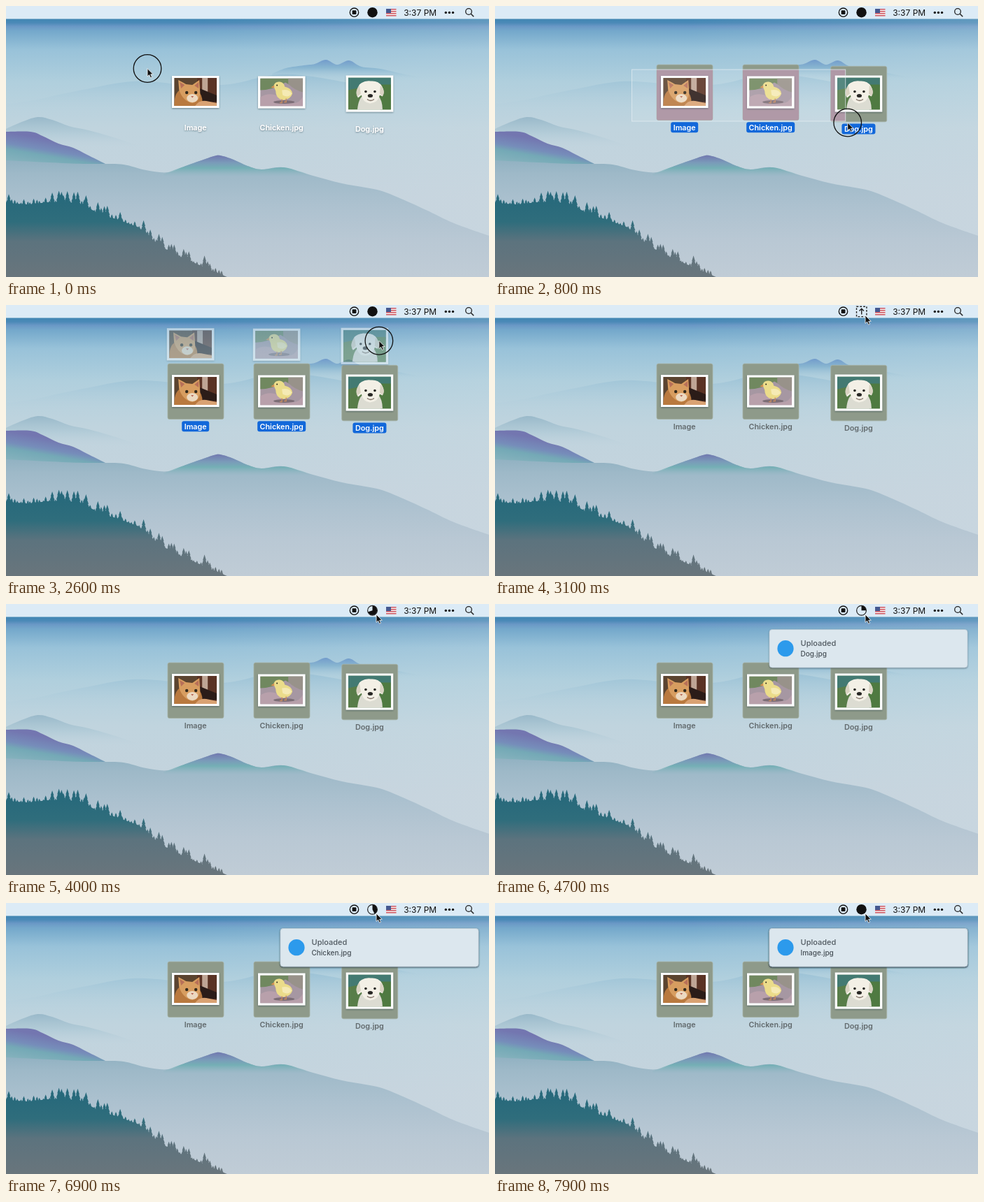
An HTML page for the animation above (8 s loop, 690 by 388 pixels).

```html
<!DOCTYPE html>
<html lang="en">
<head>
<meta charset="utf-8">
<title>Drag to upload</title>
<style>
html, body { margin: 0; width: 100%; height: 100%; overflow: hidden; }
svg { display: block; width: 100vw; height: 100vh; }
text { font-family: Inter, "Open Sans", sans-serif; }
.label { font-size: 10.8px; font-weight: 600; text-anchor: middle; }
</style>
</head>
<body>
<svg id="stage" viewBox="0 0 690 388" preserveAspectRatio="none">
  <defs>
    <linearGradient id="sky" x2="0" y2="1">
      <stop offset=".046" stop-color="#3f86b2"/><stop offset=".062" stop-color="#4b89b7"/>
      <stop offset=".075" stop-color="#6a98c6"/><stop offset=".092" stop-color="#74a8cb"/>
      <stop offset=".16" stop-color="#98c2d9"/><stop offset=".28" stop-color="#b0cfdd"/>
      <stop offset=".45" stop-color="#c0d4de"/><stop offset=".7" stop-color="#c5d3dd"/>
    </linearGradient>
    <linearGradient id="glow">
      <stop offset=".4" stop-color="#d3e0e7" stop-opacity="0"/><stop offset="1" stop-color="#d3e0e7" stop-opacity=".2"/>
    </linearGradient>
    <linearGradient id="far" gradientUnits="userSpaceOnUse" x1="0" y1="76" x2="0" y2="103">
      <stop offset="0" stop-color="#7099cb"/><stop offset=".45" stop-color="#88b5d0"/><stop offset="1" stop-color="#a6c8d9" stop-opacity="0"/>
    </linearGradient>
    <linearGradient id="faint" gradientUnits="userSpaceOnUse" x1="0" y1="104" x2="0" y2="150">
      <stop offset="0" stop-color="#8fbad2" stop-opacity=".5"/><stop offset="1" stop-color="#b4cfdc" stop-opacity="0"/>
    </linearGradient>
    <linearGradient id="mid" gradientUnits="userSpaceOnUse" x1="0" y1="158" x2="0" y2="202">
      <stop offset="0" stop-color="#98b8c9"/><stop offset=".5" stop-color="#adc8d5" stop-opacity=".8"/>
      <stop offset="1" stop-color="#bcd1dc" stop-opacity="0"/>
    </linearGradient>
    <linearGradient id="leftHill" gradientUnits="userSpaceOnUse" x1="0" y1="180" x2="-9" y2="232">
      <stop offset="0" stop-color="#7376b0"/><stop offset=".3" stop-color="#768dba"/>
      <stop offset=".46" stop-color="#74a9b6"/><stop offset="1" stop-color="#93b9c2"/>
    </linearGradient>
    <linearGradient id="ridge" gradientUnits="userSpaceOnUse" x1="0" y1="214" x2="0" y2="388">
      <stop offset="0" stop-color="#8dafc0"/><stop offset=".15" stop-color="#9eb9c8"/>
      <stop offset=".4" stop-color="#acc1cf"/><stop offset=".7" stop-color="#b9c8d4"/><stop offset="1" stop-color="#c0ccd6"/>
    </linearGradient>
    <linearGradient id="cap" gradientUnits="userSpaceOnUse" x1="0" y1="214" x2="0" y2="244">
      <stop offset="0" stop-color="#7279b0"/><stop offset=".35" stop-color="#7a9bb9"/>
      <stop offset=".6" stop-color="#74afb5"/><stop offset="1" stop-color="#8eb5c1" stop-opacity="0"/>
    </linearGradient>
    <linearGradient id="forest" gradientUnits="userSpaceOnUse" x1="0" y1="275" x2="0" y2="388">
      <stop offset="0" stop-color="#27697b"/><stop offset=".3" stop-color="#2f6d7c"/>
      <stop offset=".55" stop-color="#5c737e"/><stop offset="1" stop-color="#69757c"/>
    </linearGradient>
    <filter id="soft" x="-20%" y="-20%" width="140%" height="150%">
      <feDropShadow dx="0" dy="1" stdDeviation="1.2" flood-color="#1c3440" flood-opacity=".55"/>
    </filter>
    <clipPath id="marqueeClip"><rect id="marqueeArea"/></clipPath>
    <clipPath id="photoClip"><rect width="61" height="40"/></clipPath>
    <clipPath id="dogClip"><rect width="61" height="46"/></clipPath>

    <g id="cat" clip-path="url(#photoClip)">
      <rect width="61" height="40" fill="#5b4430"/>
      <path d="M33 0H61V40H33Z" fill="#5a3325"/><path d="M40 0H48V22H40Z" fill="#bfa595"/>
      <path d="M34 14L61 25V34L32 36Z" fill="#2b1c18"/>
      <path d="M0 40Q0 18 12 16L34 18Q42 26 40 40Z" fill="#b9793f"/>
      <path d="M7 17L6 3L17 9L26 10L36 3L37 19Q38 33 26 36Q12 33 7 17Z" fill="#d79d60"/>
      <path d="M8 6L15 10L10 15ZM29 11L35 6L35 15Z" fill="#b87058"/>
      <ellipse cx="26" cy="29" rx="8" ry="6" fill="#ecd9c1"/>
      <circle cx="18" cy="21" r="2.2" fill="#33291b"/><circle cx="31" cy="21" r="2.2" fill="#33291b"/>
      <path d="M24 26H28L26 28.5Z" fill="#b66554"/>
      <path d="M30 40Q36 31 46 33L61 36V40Z" fill="#d9a273"/>
    </g>
    <g id="chick" clip-path="url(#photoClip)">
      <rect width="61" height="40" fill="#a697a2"/>
      <path d="M0 0H61V10Q46 13 36 6Q17 17 0 17Z" fill="#70885f"/>
      <path d="M40 0H61V20Q49 17 40 8Z" fill="#98928a"/>
      <path d="M0 27Q16 17 34 30T61 26V40H0Z" fill="#b8a0ab"/>
      <ellipse cx="34" cy="34" rx="15" ry="2.5" fill="#7c6d76"/>
      <path d="M19 11Q21 4 28 5Q34 6 35 12Q45 14 46 22Q43 31 32 31Q22 29 22 18Z" fill="#ebdc8a"/>
      <path d="M31 17Q41 15 45 22Q40 29 32 24Z" fill="#f5eab4"/>
      <path d="M20 10L15 13L20 14Z" fill="#d99052"/><circle cx="24" cy="10" r="1" fill="#2d281d"/>
      <path d="M31 30V35H28M37 29V34H34" fill="none" stroke="#c58b60" stroke-width="1.4"/>
    </g>
    <g id="dog" clip-path="url(#dogClip)">
      <rect width="61" height="46" fill="#587d49"/>
      <path d="M0 0H61V14Q42 6 22 13L0 18Z" fill="#437a72"/><path d="M45 10H61V46H46Z" fill="#4f7a41"/>
      <path d="M13 46Q15 28 22 26H43Q49 33 49 46Z" fill="#dcdcd2"/>
      <path d="M16 10Q22 4 32 5Q43 4 48 12Q53 20 49 27L45 25Q43 36 31 37Q21 36 19 25L14 29Q9 22 16 10Z" fill="#f3f0e6"/>
      <path d="M16 11Q9 20 13 27L18 23ZM46 11Q54 20 49 26L45 23Z" fill="#d9d3c2"/>
      <circle cx="25" cy="20" r="1.8" fill="#272623"/><circle cx="38" cy="20" r="1.8" fill="#272623"/>
      <ellipse cx="31.5" cy="26" rx="3.6" ry="2.5" fill="#272623"/>
      <path d="M27 31Q32 35 37 31" fill="none" stroke="#7c6d63" stroke-width="1.3"/>
    </g>
  </defs>

  <rect width="690" height="388" fill="url(#sky)"/>
  <rect width="690" height="388" fill="url(#glow)"/>
  <g id="land"></g>

  <g id="files"></g>
  <g id="marqueeTint" clip-path="url(#marqueeClip)" fill="#a78d9d"></g>
  <g id="photos"></g>
  <rect id="marquee" fill="#fff" fill-opacity=".1" stroke="#e3edf2" stroke-opacity=".75"/>
  <g id="ghosts" opacity=".5"></g>

  <rect width="690" height="18.5" fill="#dcebf6"/>
  <g id="menu" fill="#111">
    <circle cx="497.5" cy="9.2" r="6.2" fill="none" stroke="#111" stroke-width="1.3"/>
    <rect x="494.6" y="6.3" width="5.8" height="5.8" rx=".8"/>
    <g id="flag">
      <rect x="543" y="4" width="14.5" height="10.5" fill="#f4eeee"/>
      <path d="M543 4.8H557.5M543 7.8H557.5M543 10.8H557.5M543 13.8H557.5" stroke="#cf5661" stroke-width="1.5"/>
      <rect x="543" y="4" width="7" height="6" fill="#45588f"/>
    </g>
    <text x="568.2" y="13.6" font-size="12">3:37 PM</text>
    <circle cx="628.3" cy="9.4" r="1.7"/><circle cx="633.4" cy="9.4" r="1.7"/><circle cx="638.5" cy="9.4" r="1.7"/>
    <path d="M664.2 11.2L668.2 15.2" stroke="#222" stroke-width="1.5"/>
    <circle cx="661" cy="8" r="4.3" fill="none" stroke="#222" stroke-width="1.3"/>
    <circle id="idle" cx="523.5" cy="9.2" r="7.2"/>
    <g id="dropHint" fill="none" stroke="#222" stroke-width="1.4">
      <rect x="516.5" y="2.2" width="14.4" height="14.4" stroke-dasharray="2.8 2"/>
      <path d="M523.7 13.5V5.5M520.5 8.5L523.7 5.2L526.9 8.5"/>
    </g>
    <g id="progress">
      <circle cx="523.5" cy="9.2" r="6.9" fill="none" stroke="#222" stroke-width="1.2"/><path id="pie"/>
    </g>
  </g>

  <g id="banners"></g>
  <circle id="press" r="19.8" fill="none" stroke="#111" stroke-width="1.3"/>
  <path id="cursor" d="M0 0V11.4L2.6 9.1L4.5 13.2L6.5 12.3L4.7 8.3H8.2Z" fill="#111" stroke="#fff" stroke-width=".8"/>
</svg>
<script>
const $ = id => document.getElementById(id);
const LOOP = 8000, STEP = 100;

function add(parent, tag, attrs, text) {
  const el = document.createElementNS("http://www.w3.org/2000/svg", tag);
  set(el, attrs);
  if (text) el.textContent = text;
  return parent.appendChild(el);
}
function set(el, attrs) {
  for (const k in attrs) el.setAttribute(k, attrs[k]);
}
const show = (el, on) => el.setAttribute("visibility", on ? "visible" : "hidden");
const clamp = v => Math.max(0, Math.min(1, v));
const ease = v => v * v * (3 - 2 * v);

// Interpolates [time, ...values] keys.
function track(keys, t, curve = v => v) {
  const i = keys.findIndex(k => k[0] > t);
  if (i < 0) return keys[keys.length - 1].slice(1);
  if (i === 0) return keys[0].slice(1);
  const a = keys[i - 1], b = keys[i], p = curve((t - a[0]) / (b[0] - a[0]));
  return a.slice(1).map((v, j) => v + (b[j + 1] - v) * p);
}

// Smooth hill through "x,y" points, closed at the given base line.
function hill(points, base, fill) {
  const p = points.split(" ").map(s => s.split(",").map(Number));
  let d = `M${p[0][0]} ${base}L${p[0]}`;
  for (let i = 0; i < p.length - 1; i++) {
    const a = p[i - 1] || p[i], b = p[i], c = p[i + 1], e = p[i + 2] || c;
    d += `C${b.map((v, k) => v + (c[k] - a[k]) / 6)} ${c.map((v, k) => v - (e[k] - b[k]) / 6)} ${c}`;
  }
  add($("land"), "path", { d: `${d}V${base}Z`, fill });
}

const summit = "262,227 285,219 297,215 306,214 325,220 345,229 365,234 395,231 ";
hill("380,97 400,89 425,85 441,83 457,77 473,84 490,78 508,87 535,90 570,98 600,103", 103, "url(#far)");
hill("0,141 45,134 80,126 125,117 150,112 180,108 215,109 260,113 320,112 380,99 430,100 500,112", 150, "url(#faint)");
hill("0,176 20,167 45,159 66,163 90,172 118,178 150,187 190,200", 202, "url(#mid)");
hill("0,180 35,180 52,186 75,197 96,203 116,213 142,226 160,234", 260, "url(#leftHill)");
hill("0,221 60,224 110,226 140,226 168,227 200,235 232,238 " + summit +
  "435,242 480,254 530,263 560,274 600,292 640,311 690,329", 388, "url(#ridge)");
hill("225,241 240,235 " + summit + "420,237 440,244", 244, "url(#cap)");

function forest() {
  const slope = [[0, 282], [30, 284], [60, 281], [85, 280], [110, 284], [130, 296], [160, 306],
    [190, 317], [210, 337], [240, 355], [265, 366], [300, 381], [318, 389]];
  let seed = 11;
  const rand = () => (seed = seed * 16807 % 2147483647) / 2147483647;
  let d = "M0 388" + slope.map(p => "L" + p).join("") + "Z";
  for (let x = -3; x < 312; x += 2.5 + rand() * 4) {
    const y = track(slope, x)[0] + 4, h = 6 + rand() ** 2 * 15, w = 2 + h * .17;
    d += `M${x} ${y - h}l${w * .45} ${h * .4}h${-w * .15}l${w * .4} ${h * .3}h${-w * .2}l${w * .7} ${h * .5}` +
      `h${-w * 2.4}l${w * .7} ${-h * .5}h${-w * .2}l${w * .4} ${-h * .3}h${-w * .15}Z`;
  }
  add($("land"), "path", { d, fill: "url(#forest)" });
}
forest();

const files = [
  { name: "Image", art: "cat", x: 237, y: 100, h: 46, pill: 39 },
  { name: "Chicken.jpg", art: "chick", x: 360, y: 100.5, h: 46, pill: 69 },
  { name: "Dog.jpg", art: "dog", x: 485.7, y: 99.5, h: 52, pill: 48 }
];

function framed(parent, f) {
  const g = add(parent, "g", { transform: `translate(${f.x} ${f.y})` });
  add(g, "rect", { width: 67.5, height: f.h, fill: "#fcfdfd", filter: "url(#soft)" });
  add(g, "use", { href: "#" + f.art, x: 3.2, y: 3 });
  return g;
}

for (const f of files) {
  const cx = f.x + 33.7, low = f.art === "dog" ? 2.3 : 0;
  const box = { x: f.x - 6, y: 84 + low, width: 80, height: 79.5, rx: 2.5 };
  f.box = add($("files"), "rect", { ...box, fill: "#8e9a8a", stroke: "#a6b2a5", "stroke-width": .8 });
  f.tint = add($("marqueeTint"), "rect", box);
  f.pillBox = add($("files"), "rect", { x: cx - f.pill / 2, y: 166.3 + low, width: f.pill, height: 15, rx: 3, fill: "#1268da" });
  f.label = add($("files"), "text", { x: cx, y: 177.5 + low, class: "label" }, f.name);
  framed($("photos"), f);
  f.ghost = framed($("ghosts"), f);
}

const banners = [["Dog.jpg", 4300], ["Chicken.jpg", 6500], ["Image.jpg", 7500]].map(([name, start]) => {
  const el = add($("banners"), "g", {});
  add(el, "rect", { x: 392, y: 36.5, width: 283, height: 54.5, rx: 4, fill: "#dce7ee", stroke: "#b2c5d0", "stroke-width": .6, filter: "url(#soft)" });
  add(el, "circle", { cx: 415, cy: 63.7, r: 11.6, fill: "#2c9aec" });
  add(el, "text", { x: 436.5, y: 60, "font-size": 11, "font-weight": 500, fill: "#505960" }, "Uploaded");
  add(el, "text", { x: 436.5, y: 74.8, "font-size": 10, "font-weight": 500, fill: "#454e55" }, name);
  return { el, start };
});

const cursorPath = [[0, 202, 89.5], [100, 195, 91], [800, 503.7, 167], [900, 507, 168], [1300, 507, 168],
  [1800, 556, 99], [2100, 540, 118], [2300, 540, 118], [2800, 529, 15]];
const uploads = [[3300, 0], [4300, 1], [4400, 0], [4700, .25], [6200, 1], [6300, 0], [6400, .02], [7600, 1]];
const DROP = 2900, DONE = 7700;

function wedge(p) {
  const a = Math.min(p, .9999) * 2 * Math.PI, r = 6.6;
  return `M523.5 9.2v${-r}A${r} ${r} 0 ${+(p > .5)} 1 ${523.5 + r * Math.sin(a)} ${9.2 - r * Math.cos(a)}Z`;
}

function draw(t) {
  const [x, y] = track(cursorPath, t, ease);
  const dragging = t >= 2200 && t < DROP, selecting = t >= 100 && t < 1000;
  $("cursor").setAttribute("transform", `translate(${x} ${y})`);
  set($("press"), { cx: x, cy: y });
  show($("press"), t < 1000 || dragging);

  const area = { x: 195.5, y: 91, width: Math.max(0, x - 198.5), height: Math.max(0, y - 93) };
  set($("marquee"), area);
  set($("marqueeArea"), area);
  show($("marquee"), selecting);

  for (const f of files) {
    const selected = t >= 1000 || selecting && x - 3 > f.x && y > f.y;
    show(f.box, selected);
    show(f.tint, selected && selecting);
    show(f.pillBox, selected && t < DROP);
    set(f.label, { fill: t >= DROP ? "#626a6d" : "#fff", filter: selected ? "none" : "url(#soft)" });
    f.ghost.setAttribute("transform", `translate(${f.x + x - 540} ${f.y + y - 118})`);
  }
  show($("ghosts"), dragging);

  const hint = t >= 2700 && t < 3300, loading = t >= 3300 && t < DONE;
  show($("dropHint"), hint);
  show($("progress"), loading);
  show($("idle"), !hint && !loading);
  $("pie").setAttribute("d", wedge(Math.max(.018, track(uploads, t)[0])));

  for (const b of banners) {
    const p = clamp((t - b.start) / 300);
    show(b.el, p > 0);
    b.el.setAttribute("transform", `translate(${300 * (1 - p) ** 2} 0)`);
  }
}

const begin = performance.now();
function tick() {
  const t = (performance.now() - begin) % LOOP;
  draw(Math.floor(t / STEP) * STEP);
  requestAnimationFrame(tick);
}
tick();
</script>
</body>
</html>
```
